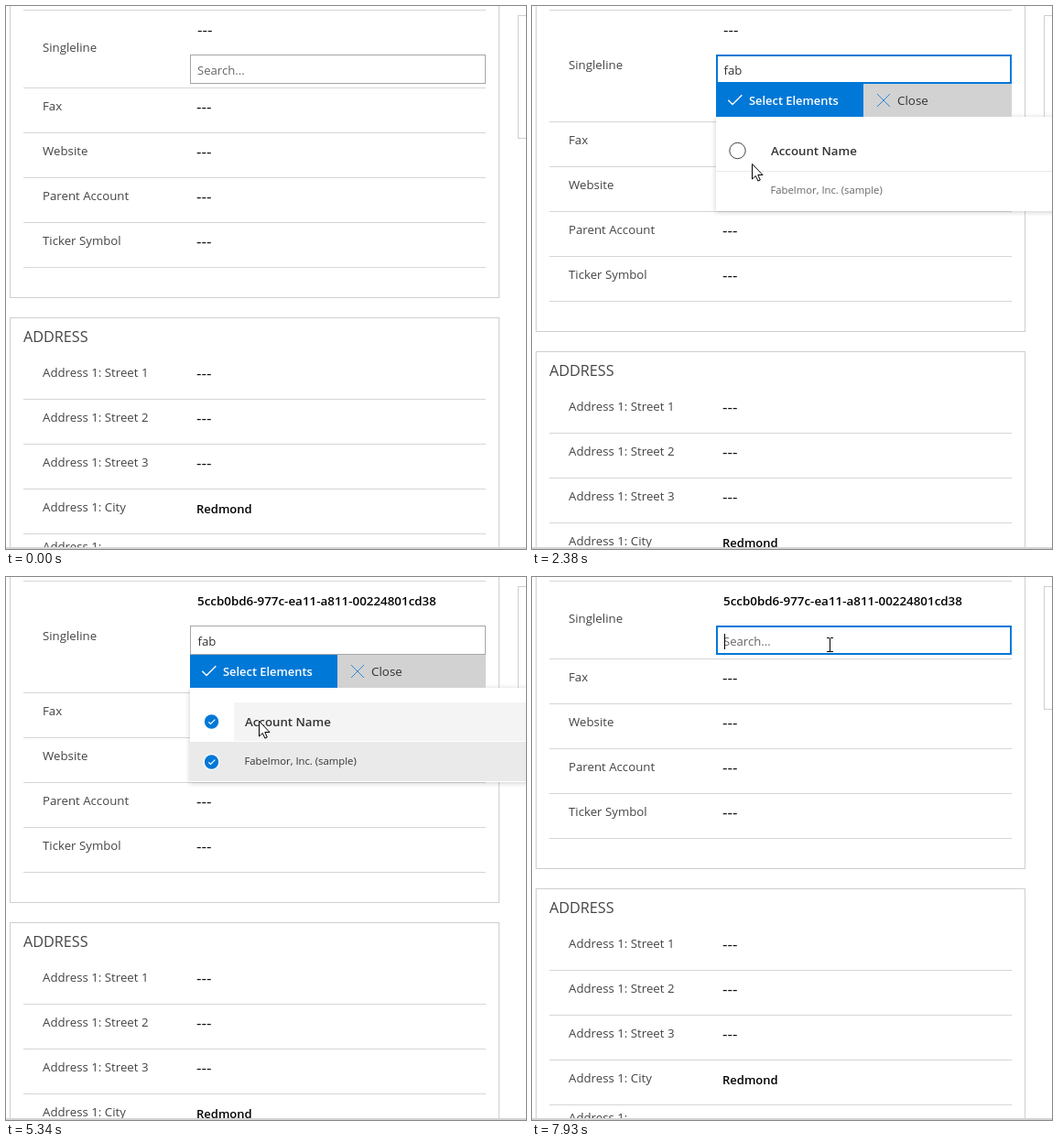
An HTML page with a canvas that plays this animation: 568x593 px, repeating every 8000 ms.

```html
<!DOCTYPE html>
<html lang="en">
<head>
<meta charset="utf-8">
<title>Lookup form</title>
<style>
  html, body { margin: 0; width: 100%; height: 100%; overflow: hidden; background: #fff; }
  canvas { display: block; }
</style>
</head>
<body>
<canvas id="stage" width="568" height="593"></canvas>
<script>
const LOOP = 8000, STEP = 80;
const BLUE = '#0078d7', LINE = '#d6d6d6', INK = '#444';
const LEFT = 201, WIDTH = 323, PITCH = 49;
const ctx = document.getElementById('stage').getContext('2d', { alpha: false });

const FORM_ROWS = ['Fax', 'Website', 'Parent Account', 'Ticker Symbol'];
const ADDRESS_ROWS = ['Street 1', 'Street 2', 'Street 3', 'City'];

const AT = {
  focus: 830, f: 910, fa: 1290, fab: 1450, results: 1680, blink: 2000,
  choose: 2850, save: 4010, close: 7210, refocus: 7850, caret: 7930
};

// Places the pointer visits
const SPOT = {
  city: [392, 549], search: [303, 73], header: [240, 172], item: [224, 194],
  edge: [251, 126], select: [255, 100], name: [276, 157], away: [505, 612],
  street: [499, 552], closeEdge: [431, 120], close: [421, 101], field: [325, 74]
};

const ROUTE = [
  [130, 'city'], [690, 'search'],
  [2150, 'search'], [2380, 'header'], [2700, 'item'],
  [3090, 'item'], [3320, 'edge'], [3560, 'select'],
  [5260, 'select'], [5340, 'name'], [6130, 'away'],
  [6350, 'street'], [6970, 'closeEdge'], [7060, 'close'],
  [7360, 'close'], [7930, 'field']
];

const smooth = u => u * u * (3 - 2 * u);

// Eased travel between spots, refreshed once per step
function pointer(t) {
  const next = ROUTE.findIndex(([time]) => time > t);
  const [start, from] = ROUTE.at(next - 1);
  if (next === 0) return { x: -50, y: -50 };
  const [end, to] = ROUTE.at(next);
  const held = Math.floor((t - start) / STEP + 0.1) * STEP;
  const u = next < 0 ? 0 : smooth(Math.min(1, held / (end - start)));
  const a = SPOT[next < 0 ? 'field' : from], b = SPOT[to];
  const [x, y] = a.map((v, i) => Math.round(v + (b[i] - v) * u));
  return { x, y };
}

function state(t) {
  const popup = t >= AT.results && t < AT.close;
  const loading = t >= AT.fa && t < AT.results;
  const focus = (t >= AT.focus && t < AT.choose) || t >= AT.refocus;
  const typed = ['f', 'fa', 'fab'].filter(q => t >= AT[q]).pop();
  return {
    t, popup, loading, focus,
    shift: popup ? 37 : loading ? 40 : 0,
    caret: focus && (t < AT.blink || t >= AT.caret),
    query: t < AT.close && typed || '',
    chosen: t >= AT.choose,
    saved: t >= AT.save,
    mouse: pointer(t)
  };
}

function rect(x, y, w, h, color) {
  ctx.fillStyle = color;
  ctx.fillRect(x, y, w, h);
}

function frame(x, y, w, h, color, weight = 1) {
  ctx.strokeStyle = color;
  ctx.lineWidth = weight;
  ctx.strokeRect(x + weight / 2, y + weight / 2, w - weight, h - weight);
}

function text(str, x, y, size = 13.25, color = INK, weight = 400) {
  ctx.font = `${weight} ${size}px "Open Sans", "Noto Sans", sans-serif`;
  ctx.fillStyle = color;
  ctx.fillText(str, x, y);
}

function path(pts, color, weight) {
  ctx.beginPath();
  pts.forEach(([x, y]) => ctx.lineTo(x, y));
  ctx.strokeStyle = color;
  ctx.lineWidth = weight;
  ctx.stroke();
}

function ring(x, y, r, color, weight = 1, from = 0, to = Math.PI * 2) {
  ctx.beginPath();
  ctx.arc(x, y, r, from, to);
  ctx.strokeStyle = color;
  ctx.lineWidth = weight;
  ctx.stroke();
}

function disc(x, y, r, color) {
  ctx.beginPath();
  ctx.arc(x, y, r, 0, Math.PI * 2);
  ctx.fillStyle = color;
  ctx.fill();
}

// A tick whose short arm is s wide, with its corner at (x, y)
const tick = (x, y, s, weight) =>
  path([[x - s, y - s], [x, y], [x + 2.2 * s, y - 2.2 * s]], '#fff', weight);

const inside = (m, x, y, w, h) => m.x >= x && m.x < x + w && m.y >= y && m.y < y + h;

const dashes = (x, y) => text('---', x, y, 17, '#111');

// One labelled field; returns true while the pointer is over its box.
function row(label, top, s, value) {
  text(label, 40, top + 25);
  if (value) text(value, 208, top + 27, 13, '#000', 600);
  else dashes(208, top + 27);
  rect(19, top + PITCH, 505, 1, LINE);
  const covered = s.popup && s.mouse.y < 224;
  const over = !covered && inside(s.mouse, LEFT, top + 4, WIDTH, 35);
  if (over) frame(LEFT, top + 4, WIDTH, 35, '#666');
  return over;
}

function search(s) {
  const over = inside(s.mouse, LEFT, 53, WIDTH, 32);
  if (s.focus) frame(LEFT, 53, WIDTH, 32, BLUE, 2);
  else frame(LEFT, 53, WIDTH, 32, over ? '#666' : '#a6a6a6');
  if (s.query) text(s.query, 209.5, 75, 13.25, '#333');
  else text('Search...', 209, 75, 13.1, '#666');
  if (s.caret) rect(210 + Math.round(ctx.measureText(s.query).width), 62, 1, 17, '#000');
  return over;
}

function spinner(t) {
  const turn = (t - AT.fa) / 1300 * Math.PI * 2 - Math.PI / 2;
  ring(362, 105, 9.2, '#c7e0f4', 1.6);
  ring(362, 105, 9.2, BLUE, 1.6, turn - Math.PI / 4, turn + Math.PI / 4);
}

function radio(x, y, on) {
  if (!on) return ring(x, y, 8.7, INK);
  disc(x, y, 9, '#fff');
  disc(x, y, 7.7, BLUE);
  tick(x - 1, y + 2.5, 2.2, 1.2);
}

function buttons(m) {
  const over = x => inside(m, x, 85, 162, 36);
  rect(LEFT, 85, 161, 36, over(LEFT) ? '#106ebe' : BLUE);
  rect(362, 85, 162, 36, over(362) ? '#c6c6c6' : '#d2d2d2');
  tick(219, 107.5, 4.7, 1.4);
  text('Select Elements', 237, 108, 12.9, '#fff', 600);
  for (const d of [7, -7]) path([[384 - d, 96], [384 + d, 110]], '#2b88d8', 1);
  text('Close', 399, 108, 13.4, '#333');
}

function popup(s) {
  ctx.save();
  ctx.shadowColor = 'rgba(0,0,0,.2)';
  ctx.shadowBlur = 6;
  ctx.shadowOffsetY = 1;
  rect(LEFT, 121, 400, 103, '#fff');
  ctx.restore();
  buttons(s.mouse);

  const overItem = inside(s.mouse, LEFT, 181, 367, 42);
  if (inside(s.mouse, 249, 137, 330, 43)) rect(249, 137, 319, 42, '#f4f4f4');
  rect(LEFT, 180, 367, 1, '#eaeaea');
  if (s.chosen) rect(LEFT, 180, 367, 43, '#eaeaea');
  else if (overItem) rect(LEFT, 181, 367, 42, '#f4f4f4');
  radio(224.5, 158, s.chosen);
  if (s.chosen || overItem) radio(224.5, 202, s.chosen);
  text('Account Name', 261, 163, 13.25, '#333', 600);
  text('Fabelmor, Inc. (sample)', 260.5, 205, 11.3, s.chosen ? '#333' : '#666');
}

function arrow(x, y) {
  ctx.save();
  ctx.translate(x + 0.5, y + 0.5);
  const shape = new Path2D('M0 0V16.5L3.8 13 6.4 18.6 8.8 17.5 6.3 12H11.5Z');
  ctx.fillStyle = '#fff';
  ctx.fill(shape);
  ctx.strokeStyle = '#000';
  ctx.lineWidth = 1;
  ctx.stroke(shape);
  ctx.restore();
}

function beam(x, y) {
  rect(x, y - 7, 1, 15, '#000');
  for (const edge of [y - 8, y + 7]) {
    rect(x - 3, edge, 3, 1, '#000');
    rect(x + 1, edge, 3, 1, '#000');
  }
}

function draw(t) {
  const s = state(t), o = s.shift;
  rect(0, 0, 568, 593, '#fff');

  frame(4, -20, 535, 339 + o, '#cfcfcf');
  frame(4, 340 + o, 535, 400, '#cfcfcf');
  frame(559, 10, 40, 135, '#cfcfcf');

  rect(19, 4, 505, 1, LINE);
  text('Singleline', 40, 50 + Math.round(o / 2));
  if (s.saved) text('5ccb0bd6-977c-ea11-a811-00224801cd38', 209, 31, 13.4, '#000', 600);
  else dashes(209, 32);
  rect(19, 89 + o, 505, 1, LINE);

  const overForm = FORM_ROWS.map((name, i) => row(name, 89 + o + i * PITCH, s));
  text('ADDRESS', 19, 367 + o, 16.2);
  const overAddress = ADDRESS_ROWS.map((name, i) =>
    row('Address 1: ' + name, 380 + o + i * PITCH, s, name === 'City' && 'Redmond'));
  text('Address 1:', 40, 595 + o);

  const typing = [search(s), ...overForm, ...overAddress].includes(true);
  if (s.loading) spinner(t);
  if (s.popup) popup(s);

  rect(0, 591, 568, 2, '#d4d4d4');
  (typing ? beam : arrow)(s.mouse.x, s.mouse.y);
}

function run() {
  draw(performance.now() % LOOP);
  requestAnimationFrame(run);
}
run();
</script>
</body>
</html>
```
